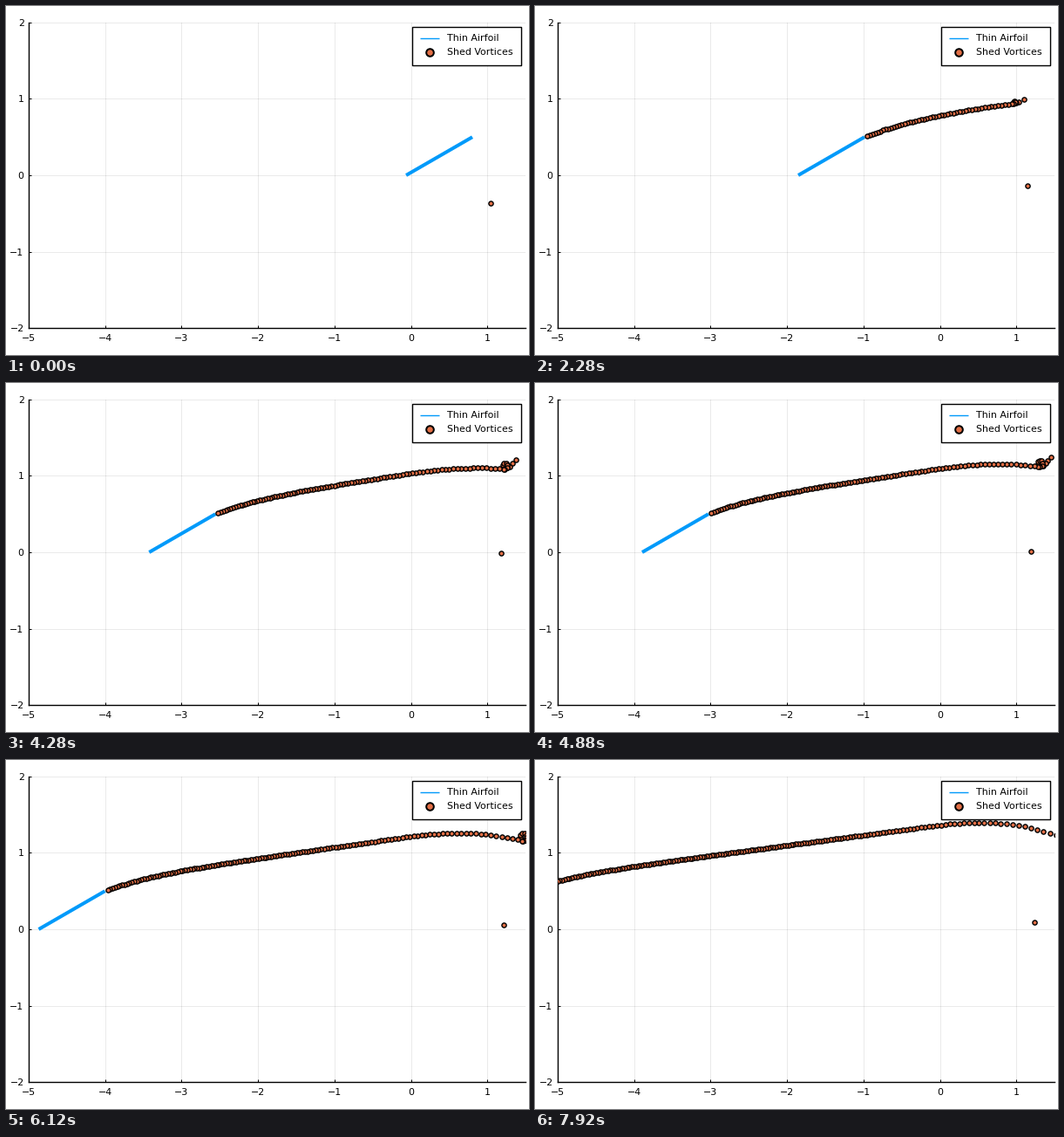
A matplotlib script that plays this animation: 600x400 px, repeating every 7960 ms.

```python
import matplotlib.pyplot as plt
import numpy as np
from matplotlib.animation import FuncAnimation
from matplotlib.patches import Rectangle

W, H, DPI = 600, 400, 100
PX = 72 / DPI  # points per pixel
FRAMES, INTERVAL = 199, 40
DT = 2 * np.pi / 200
CHORD = np.array([np.cos(np.pi / 6), 0.5])
BLUE, ORANGE = "#009AFA", "#E26F46"
LEFT, RIGHT, TOP, BOTTOM = 26.1, 596.1, 18.9, 369.1

plt.rcParams.update({"font.family": "DejaVu Sans", "font.size": 11 * PX})


def leading_edge(k):
    return -(k + 2) * DT


def starting_vortex(k):
    return 1.046 + 0.0132 * np.sqrt(k), 0.17 - 0.539 * np.exp(-k / 100)


def sheet_height(x, k):
    """Height of the vortex sheet above the axis at x."""
    d = x - leading_edge(k) - CHORD[0]
    rise = 0.497 + 0.133 * d + 0.147 * (1 - np.exp(-d / 0.55))
    rise = rise + 0.00022 * d * (198 - k)
    bend = 0.16 * (1 - np.exp(-max(k - 45, 0) / 80))
    return rise - bend * (np.maximum(x + 0.2, 0) / 1.2) ** 2.5


def wake(k):
    """Shed vortices, newest first: a stretched sheet ending in a roll-up."""
    if k == 0:
        return np.empty(0), np.empty(0)
    newest = leading_edge(k) + CHORD[0] + 0.035
    end = max(0.65 + 0.0052 * k, newest)

    # Sheet spacing widens downstream and with time.
    grid = np.linspace(newest, end, 600)
    stretch = 1 + (0.02 + 0.01 * k) / (1 + np.exp(-(grid - 0.3) / 0.65))
    density = 1 / (DT * stretch)
    step = grid[1] - grid[0]
    count = np.concatenate(
        [[0], np.cumsum((density[1:] + density[:-1]) / 2 * step)])
    m = np.arange(k)
    x = np.interp(m, count, grid)
    y = sheet_height(x, k)

    # Roll-up between the end of the sheet and its oldest vortex.
    s = np.clip((m - count[-1]) / max(k - 1 - count[-1], 1), 0, 1)
    tip_x = 0.792 + 0.0054 * k
    tip_y = 1.42 - 0.92 * np.exp(-k / 73)
    mix = 0.55 * s + 0.45 * s ** 12
    radius = 0.00048 * k * np.sin(np.pi * s)
    angle = -np.pi / 2 + 2.6 * np.pi * s
    curled = s > 0
    x = np.where(curled, end + (tip_x - end) * mix + radius * np.cos(angle), x)
    y_end = sheet_height(end, k)
    y = np.where(curled,
                 y_end + (tip_y - y_end) * mix + radius * np.sin(angle), y)
    return x, y


fig = plt.figure(figsize=(W / DPI, H / DPI), dpi=DPI, facecolor="white")
ax = fig.add_axes([LEFT / W, 1 - BOTTOM / H,
                   (RIGHT - LEFT) / W, (BOTTOM - TOP) / H])
ax.set(xlim=(-5, 1.5), ylim=(-2, 2),
       xticks=range(-5, 2), yticks=range(-2, 3))
ax.set_axisbelow(True)
ax.grid(color="black", alpha=0.1, linewidth=0.8 * PX)
ax.tick_params(direction="in", length=3 * PX, width=1 * PX)
ax.tick_params(axis="x", pad=6.4 * PX)
ax.tick_params(axis="y", pad=5.5 * PX)
for side in ("top", "right"):
    ax.spines[side].set_visible(False)
for side in ("left", "bottom"):
    ax.spines[side].set_linewidth(1.4 * PX)

airfoil, = ax.plot([], [], color=BLUE, linewidth=4 * PX,
                   solid_capstyle="butt", zorder=3)
vortices, = ax.plot([], [], "o", color=ORANGE, markersize=5.2 * PX,
                    markeredgecolor="black", markeredgewidth=1.4 * PX,
                    zorder=4)

# Legend, laid out in pixels.
key = fig.add_axes([0, 0, 1, 1], zorder=5)
key.set(xlim=(0, W), ylim=(H, 0))
key.axis("off")
key.add_patch(Rectangle((466, 24), 125, 44, facecolor="white",
                        edgecolor="black", linewidth=1.4 * PX))
key.plot([475, 497], [37, 37], color=BLUE, linewidth=1.4 * PX,
         solid_capstyle="butt")
key.plot([486], [53], "o", color=ORANGE, markersize=8.6 * PX,
         markeredgecolor="black", markeredgewidth=2 * PX)
key.text(505.5, 40.5, "Thin Airfoil")
key.text(505.5, 56.5, "Shed Vortices")


def draw(k):
    x0 = leading_edge(k)
    airfoil.set_data([x0, x0 + CHORD[0]], [0, CHORD[1]])
    sx, sy = starting_vortex(k)
    x, y = wake(k)
    # Oldest first, so newer vortices lie on top.
    vortices.set_data(np.append(sx, x[::-1]), np.append(sy, y[::-1]))
    return airfoil, vortices


anim = FuncAnimation(fig, draw, frames=FRAMES, interval=INTERVAL,
                     init_func=lambda: draw(0), repeat=True, repeat_delay=0)
plt.show()
```
